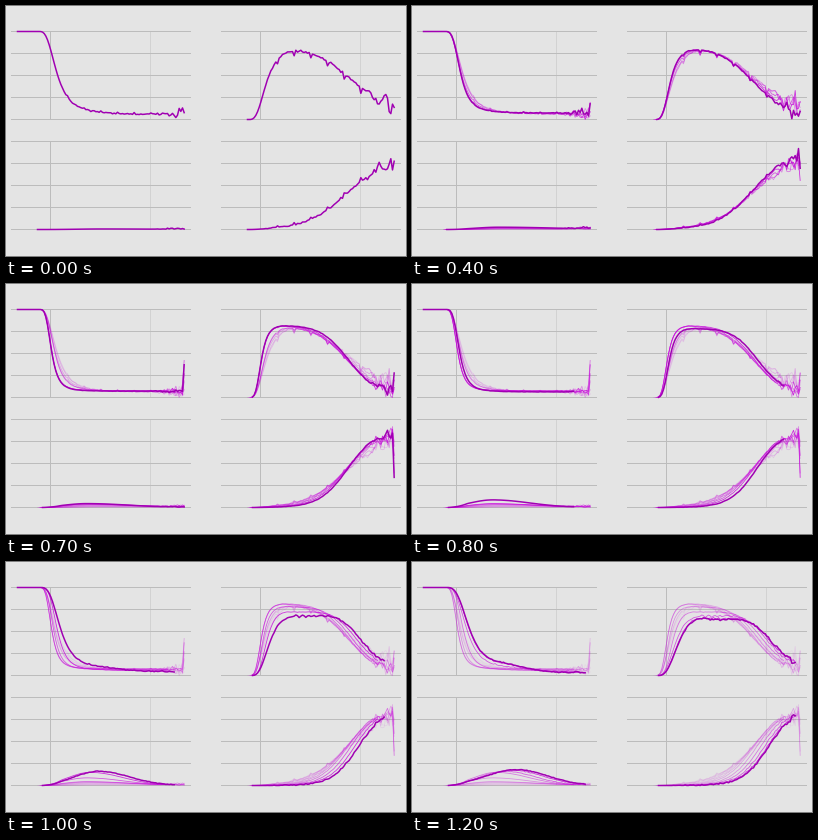
Write a matplotlib script that moves like this. It is 400x250 px and loops after 1.3 s.

```python
import numpy as np
import matplotlib.pyplot as plt
from matplotlib.animation import FuncAnimation

W, H, DPI = 400, 250, 100
PX = 72 / DPI
STEPS, STEP_MS = 13, 100

BACK = "#e4e4e4"
GRID, GRID_PALE = "#bcbcbc", "#d2d2d2"
NEW, OLD = "#a000b2", "#c80adc"

# left and top edge of each panel
PANELS = {
    "single": (5, 25),
    "married": (215, 25),
    "divorced": (5, 135),
    "widowed": (215, 135),
}
PANEL_W, PANEL_H = 180, 88
AGE_PX = 5 / 3


def ramp(t, start, end):
    """Smooth step from 0 to 1."""
    u = np.clip((t - start) / (end - start), 0, 1)
    return u * u * (3 - 2 * u)


def log_logistic(x, half, power):
    return 1 / (1 + (np.clip(x, 0, None) / half) ** power)


def bell(x, mid, left, right):
    return np.exp(-((x - mid) / np.where(x < mid, left, right)) ** 2 / 2)


def single_share(x, step):
    # marriage comes earlier up to mid-century, then ever later
    half = (17.5 - 2.5 * ramp(step, 0, 3) - 3 * ramp(step, 4, 5)
            + 11.3 * ramp(step, 7, 11.5))
    power = 2.8 + .8 * ramp(step, 1, 6) - .55 * ramp(step, 9, 10)
    floor = .055 + .02 * ramp(step, 0, 5) - .045 * ramp(step, 6, 12)
    onset = 33 + ramp(step, 7, 9)
    bump = .055 * ramp(step, 8.5, 11.5) * bell(x, 95, 19, 19)
    return floor + (1 - floor) * log_logistic(x - onset, half, power) + bump


def divorced_share(x, step):
    peak = (.006 + .04 * ramp(step, 0, 8) + .115 * ramp(step, 7, 9.5)
            + .02 * ramp(step, 10, 12))
    mid = 95 - 15 * ramp(step, 0, 7) + 24 * ramp(step, 8, 12)
    left = 22 + 8 * ramp(step, 9, 12)
    right = 60 - 29 * ramp(step, 3, 10)
    return peak * bell(x, mid, left, right)


def widowed_share(x, step):
    top = .81 + .07 * ramp(step, 0, 4)
    mid = 130 + 16 * ramp(step, 6, 12)
    width = 20 - 7 * ramp(step, 1, 9)
    return top / (1 + np.exp((mid - x) / width))


def shares(step):
    """Share of people in each state by age."""
    rng = np.random.default_rng(40 + step)
    top_age = 100 if step < 8 else 90 + min(7, 4 * max(0, step - 9))
    age = np.arange(top_age + 1)
    x = 11 + age * AGE_PX
    adult = np.clip((x - 35) / 20, 0, 1)

    # small samples among the old, and ages rounded to tens
    grown = np.clip((age - 18) / 20, 0, 1)
    frail = np.clip((age - 80) / 18, 0, 1) ** 1.5
    mid_noise = .006 - .0045 * ramp(step, 0, 7) + .0035 * ramp(step, 9, 10)
    tail_noise = 1 - .85 * ramp(step, 5, 9)
    heap = (1 - ramp(step, 0, 7)) * ((age % 10 == 0) & (age >= 30))

    def jitter(mid, tail):
        return rng.normal(size=age.size) * (
            mid_noise * mid * grown + tail_noise * tail * frail)

    single = single_share(x, step) + jitter(.6, .03) + .015 * heap
    divorced = (divorced_share(x, step) * adult + abs(jitter(0, .012))
                + jitter(.4 * ramp(step, 7, 10), 0))
    widowed = (widowed_share(x, step) * adult + jitter(.3 + age / 90, .055)
               + .03 * heap * age / 60)

    # the oldest group is badly counted around mid-century
    swap = .6 * rng.uniform(.4, 1) * ramp(step, 1, 6) * (top_age == 100)
    single[-1] += .6 * swap
    widowed[-1] -= swap

    married = (.945 * (1 - single - divorced - widowed)
               + jitter(.5, .025) - .015 * heap)

    first = 12 + min(3, step * .35)
    out = {"single": single, "married": married,
           "divorced": divorced, "widowed": widowed}
    for name, share in out.items():
        hidden = (age < first) & (name != "single")
        out[name] = np.where(hidden, np.nan, np.clip(share, 0, 1))
    return x, out


fig = plt.figure(figsize=(W / DPI, H / DPI), dpi=DPI, facecolor=BACK)
ax = fig.add_axes([0, 0, 1, 1])
ax.set(xlim=(0, W), ylim=(H, 0))
ax.axis("off")


def draw_grid(left, top):
    def rule(xs, ys, color):
        ax.plot(xs, ys, color=color, lw=PX, zorder=1,
                solid_capstyle="butt", snap=False)

    for x, color in ((left + 139.5, GRID_PALE), (left + 39.5, GRID)):
        rule([x, x], [top, top + PANEL_H], color)
    for y in np.linspace(top, top + PANEL_H, 5) + .5:
        rule([left, left + PANEL_W], [y, y], GRID)


for corner in PANELS.values():
    draw_grid(*corner)

curves = []
for step in range(STEPS):
    x, data = shares(step)
    group = []
    for name, (left, top) in PANELS.items():
        y = top + .5 + PANEL_H * (1 - data[name])
        group += ax.plot(left - 5 + x + .5, y, zorder=2 + step, snap=False,
                         solid_joinstyle="round", visible=False)
    curves.append(group)


def update(now):
    for step, group in enumerate(curves):
        back = now - step
        for line in group:
            line.set_visible(back >= 0)
            if back == 0:
                line.set(color=NEW, linewidth=1.5 * PX, alpha=1)
            elif back > 0:
                line.set(color=OLD, linewidth=.8 * PX,
                         alpha=.85 * .77 ** (back - 1))
    return [line for group in curves for line in group]


anim = FuncAnimation(fig, update, frames=STEPS, interval=STEP_MS,
                     repeat=True, repeat_delay=0, blit=False)
plt.show()
```
